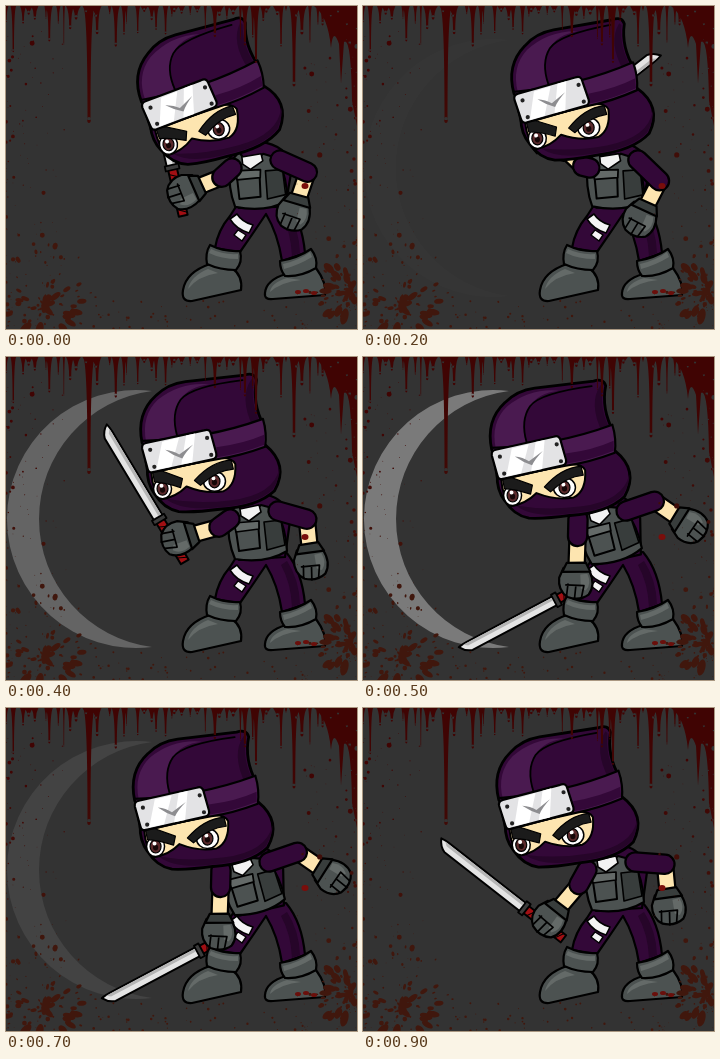
Recreate the animation shown at these times as an HTML page with a canvas. Size 351x323 px, loop 1000 ms.

```html
<!DOCTYPE html>
<html lang="en">
<head>
<meta charset="utf-8">
<title>Ninja</title>
<style>
html, body { margin: 0; width: 100%; height: 100%; overflow: hidden; background: #333; }
canvas { display: block; }
</style>
</head>
<body>
<canvas id="stage" width="351" height="323"></canvas>
<script>
const g = document.getElementById('stage').getContext('2d');
const PURPLE = '#330838', SHADE = '#260529', LILAC = '#4a1a50';
const GREY = '#4c5251', LIGHT = '#646a68', DARK = '#383d3c', SKIN = '#fde5b0';

// Stances: head and sword as x, y, turn; free hand as x, y
const ready = { at: 0, head: [189, 130, -9], sword: [166, 161, -103], hand: [288, 206], lean: 2 };
const windup = { at: 3, head: [203, 126, -3.5], sword: [216, 107, -30], hand: [276, 213], lean: 3 };
const raised = { at: 4, head: [184, 127.5, -0.5], sword: [153, 162, -121], hand: [305, 204], lean: 0 };
const slash = { at: 5, head: [177, 134, -1], sword: [193, 243, -208], hand: [326, 168], lean: -9 };
const rest = { ...slash, at: 7 };
const recover = { at: 9, head: [185.5, 131.5, -3], sword: [161, 200, -142], hand: [306, 198], lean: 0 };
const stances = [ready, windup, raised, slash, rest, recover];

function mix(a, b, t) {
  return Array.isArray(a) ? a.map((v, k) => mix(v, b[k], t)) : a + (b - a) * t;
}

function stanceAt(i) {
  const k = stances.findLastIndex(s => s.at <= i);
  const a = stances[k], b = stances[k + 1] || a;
  const t = 1 - (1 - (i - a.at) / (b.at - a.at || 1)) ** 2;
  return Object.fromEntries(Object.keys(a).map(key => [key, mix(a[key], b[key], t)]));
}

function shape(d, fill, line = 2.2) {
  const p = new Path2D(d);
  if (fill) { g.fillStyle = fill; g.fill(p); }
  if (line) { g.strokeStyle = '#000'; g.lineWidth = line; g.stroke(p); }
}

function oval(x, y, rx, ry, fill, line = 0) {
  g.beginPath();
  g.ellipse(x, y, rx, ry, 0, 0, 7);
  g.fillStyle = fill;
  g.fill();
  if (line) { g.strokeStyle = '#000'; g.lineWidth = line; g.stroke(); }
}

// Draws with the pivot (px, py) moved to (x, y) and turned by deg
function placed([x, y, deg], [px, py], draw) {
  g.save();
  g.translate(x, y);
  g.rotate(deg * Math.PI / 180);
  g.translate(-px, -py);
  draw();
  g.restore();
}

function limb(points, width, fill) {
  for (const [w, c] of [[width + 4.5, '#000'], [width, fill]]) {
    g.beginPath();
    points.forEach(p => g.lineTo(...p));
    g.lineWidth = w;
    g.strokeStyle = c;
    g.stroke();
  }
}

function glove() {
  shape('M-10-13Q4-20 14-13Q21-4 17 8Q11 18-2 17L-12 13Z', GREY);
  shape('M-7-11Q3-16 10-10L8-5L-6-4Z', LIGHT, 0);
  shape('M-18-9L-9-14L-8 14L-17 10Z', DARK);
  shape('M5-8L17-6M5 0L19 1M4 8L16 9M5-8V10', null, 1.7);
}

function arm(shoulder, elbow, hand) {
  const turn = Math.atan2(hand[1] - elbow[1], hand[0] - elbow[0]) * 180 / Math.PI;
  limb([elbow, mix(elbow, hand, .7)], 14, SKIN);
  limb([shoulder, elbow], 17, PURPLE);
  placed([...hand, turn], [0, 0], glove);
}

// The sword hand sits beside the grip
function gripPoint([x, y, deg]) {
  const a = deg * Math.PI / 180, c = Math.cos(a), s = Math.sin(a);
  return [x - 27 * c - 8 * s, y - 27 * s + 8 * c];
}

// Elbow of a two-bone arm that bends outward
function bend([sx, sy], [hx, hy], upper = 30, lower = 42) {
  const d = Math.min(Math.hypot(hx - sx, hy - sy), upper + lower);
  const a = Math.atan2(hy - sy, hx - sx) - Math.acos((upper ** 2 + d ** 2 - lower ** 2) / (2 * upper * d));
  return [sx + upper * Math.cos(a), sy + upper * Math.sin(a)];
}

function sword() {
  shape('M-50-4.5H0V4.5H-50Z', '#a10f13', 2);
  for (let x = 7; x < 48; x += 9) shape(`M${-x}-4L${-x - 4} 4`, null, 1);
  shape('M0-5H97Q104-3 108 4Q104 5 99 5H0Z', '#e4e4e4', 2);
  shape('M3 1H99L103 4H3Z', '#b5b5b5', 0);
  shape('M-3-7H2V7H-3Z', '#3b3b3b', 1.8);
}

function legs() {
  shape('M231 199L280 195Q296 214 299 247L276 255Q272 228 260 208Q248 226 234 246L209 242Q212 224 224 210Z', PURPLE);
  shape('M281 204Q293 222 294 247L286 250Q285 226 275 208Z', SHADE, 0);
  shape('M224 213L231 208Q236 216 247 219L243 227Q230 223 224 213Z', '#f4f4f4', 1.6);
  shape('M232 224L240 229L236 235L228 229Z', '#f4f4f4', 1.4);
  shape('M204 258Q180 266 177 284Q175 296 186 295L235 284Q237 270 226 262Z', GREY);
  shape('M202 263Q185 270 182 283Q192 270 212 267Z', LIGHT, 0);
  shape('M204 239Q218 246 234 245Q237 256 230 264Q214 264 201 258Q199 247 204 239Z', GREY);
  shape('M205 243Q217 249 232 248L232 253Q215 253 203 247Z', LIGHT, 0);
  shape('M280 268Q260 274 259 287Q258 294 267 293L319 289Q321 277 310 262Z', GREY);
  shape('M281 272Q265 277 264 286Q275 276 295 274Z', LIGHT, 0);
  shape('M274 255Q292 252 305 243Q312 252 310 262Q295 271 279 270Q274 264 274 255Z', GREY);
  shape('M277 258Q294 254 304 246L306 251Q293 259 278 263Z', LIGHT, 0);
}

function torso() {
  shape('M220 156Q234 134 258 137Q282 142 284 164L279 200L233 203Z', PURPLE);
  shape('M222 158L231 147L241 160L255 148L270 152Q280 172 281 194Q260 207 229 202Q221 184 222 158Z', GREY);
  shape('M234 152L253 148L255 155L243 164L235 159Z', '#f2f2f2', 1.6);
  shape('M258 165L275 163L279 188L261 193Z', DARK, 1.6);
  shape('M229 167L252 165L254 191L233 194Z', GREY, 2);
  shape('M228 166L253 164L253 172L230 175Z', LIGHT, 1.7);
}

function eye(x, y, rx) {
  oval(x, y, rx, 10, '#fff', 1.5);
  oval(x, y, 5.5, 6.5, '#5b2a2c', 1.2);
  oval(x, y + 1, 2.6, 3, '#160708');
  oval(x - 1, y - 3, 2, 2, '#fff');
}

function head() {
  shape('M142 112Q141 127 149 138Q158 153 173 156Q190 157 214 154Q252 152 269 136Q284 110 260 90L205 80Z', PURPLE, 2.8);
  shape('M274 114Q268 140 226 145Q192 149 160 143Q176 156 214 152Q250 150 267 135Q275 122 274 114Z', SHADE, 0);
  shape('M146 117L212 103Q227 102 230 109Q231 130 218 136Q200 139 181 131Q170 142 154 144Q147 134 146 117Z', SKIN, 2);
  eye(157, 133, 9);
  eye(209, 126, 11);
  shape('M147 115L156 115L177 123L175 132Q161 127 149 126Z', '#1b1b1b', 1.2);
  shape('M189 125Q206 106 226 105L228 114Q211 115 195 130Z', '#1b1b1b', 1.2);

  shape('M137 87Q131 58 151 40Q163 28 181 26L240 20Q250 17 252 25Q247 48 259 71V80L205 90Z', PURPLE, 2.8);
  shape('M172 84Q166 60 176 44Q184 31 205 29Q176 26 153 44Q136 60 141 86Z', LILAC, 0);
  shape('M247 24Q234 42 248 72L257 71Q245 50 249 26Z', SHADE, 0);
  shape('M172 80Q166 58 176 44Q186 31 238 25', null, 1.8);
  shape('M137 85Q201 84 258 64Q262 78 260 92Q235 101 212 104L142 116Z', LILAC);
  shape('M211 92Q238 89 259 80L259 90Q235 99 212 102Z', PURPLE, 0);

  shape('M137 93Q136 88 141 87L199 75Q205 73 206 79L211 98Q212 103 207 104L149 116Q143 118 142 112Z', '#e3e3e5');
  shape('M157 86L174 82L166 111L151 114Z', '#fff', 0);
  shape('M181 80L190 78L187 107L176 109Z', '#fff', 0);
  shape('M160 94Q168 95 174 99L188 89Q180 97 177 103Q168 100 160 94Z', '#8d8d90', 0);
  for (const x of [145, 202]) {
    const y = 123 - x * .2;
    oval(x, y, 2.1, 2.1, '#222');
    oval(x + 4, y + 17, 2.1, 2.1, '#222');
  }
}

let seed = 11;
function rnd() {
  seed = (seed * 16807) % 2147483647;
  return seed / 2147483647;
}

// Drips, splashes and specks, gathered once into one path
function makeBlood() {
  const p = new Path2D();
  const blob = (x, y, rx, ry = rx, a = 0) => {
    p.moveTo(x + rx * Math.cos(a), y + rx * Math.sin(a));
    p.ellipse(x, y, rx, ry, a, 0, 2 * Math.PI);
  };
  const drip = (x, len, w) => {
    p.addPath(new Path2D(`M${x - w * 2} 0Q${x - w / 2} 5 ${x - w / 2} ${len}H${x + w / 2}Q${x + w / 2} 5 ${x + w * 2} 0Z`));
    blob(x, len, w * .6, w);
  };
  for (let x = 0; x < 351; x += 7) {
    const edge = Math.min(1, .3 + Math.abs(x - 175) / 175);
    drip(x + rnd() * 6, 4 + 55 * edge * rnd() ** 2, .6 + 2 * rnd());
  }
  drip(83, 114, 3);
  drip(250, 55, 2);
  drip(288, 78, 2.5);
  p.addPath(new Path2D('M308 0Q322 10 325 42Q327 20 333 38L335 78L338 36Q345 30 346 95L351 120V0Z'));

  // Drops thrown outward from the two lower corners
  for (const [cx, cy, spread] of [[38, 300, 58], [344, 285, 36]]) {
    for (let i = 0; i < 75; i++) {
      const a = rnd() * 2 * Math.PI, d = spread * rnd(), r = .7 + 3.3 * rnd() ** 2;
      blob(cx + d * Math.cos(a), cy + d * 1.1 * Math.sin(a), r * (1.2 + rnd()), r, a);
    }
  }
  for (let i = 0; i < 260; i++) {
    const y = 323 - 310 * rnd() ** 1.4, d = 60 * rnd() ** 2;
    blob(rnd() < .5 ? d : 351 - d, y, .4 + 2.2 * rnd() ** 4);
  }
  for (let i = 0; i < 50; i++) blob(80 + rnd() * 220, 323 - 28 * rnd() ** 1.5, .4 + rnd());
  return p;
}
const blood = makeBlood();
const bloodTone = g.createLinearGradient(0, 60, 0, 240);
bloodTone.addColorStop(0, '#400403');
bloodTone.addColorStop(1, '#40170d');

function draw(i) {
  const { head: face, sword: blade, hand, lean } = stanceAt(i);
  const glow = .35 * Math.exp(-.38 * (i - 5) ** 2);
  const left = [224 + lean, 162], right = [272 + lean, 154], grip = gripPoint(blade);
  const [ex, ey] = mix(left, grip, .22);

  g.fillStyle = '#333';
  g.fillRect(0, 0, 351, 323);
  shape('M146 34A129 129 0 1 0 146 290A129 129 0 0 1 146 34Z', `rgba(255,255,255,${glow})`, 0);
  placed(blade, [0, 0], sword);
  legs();
  placed([262, 206, lean], [262, 206], torso);
  arm(left, [ex, ey + 4], grip);
  arm(right, bend(right, hand), hand);
  placed(face, [184.5, 129], head);
  g.fillStyle = bloodTone;
  g.fill(blood);
  oval(299, 180, 3.5, 3, '#7a0e0b');
  for (let x = 292; x < 315; x += 8) oval(x, 285 + x % 3, 3, 2, '#6a0f0b');
}

g.lineJoin = g.lineCap = 'round';
function tick() {
  draw(Math.floor(performance.now() / 100) % 10);
  requestAnimationFrame(tick);
}
tick();
</script>
</body>
</html>
```
